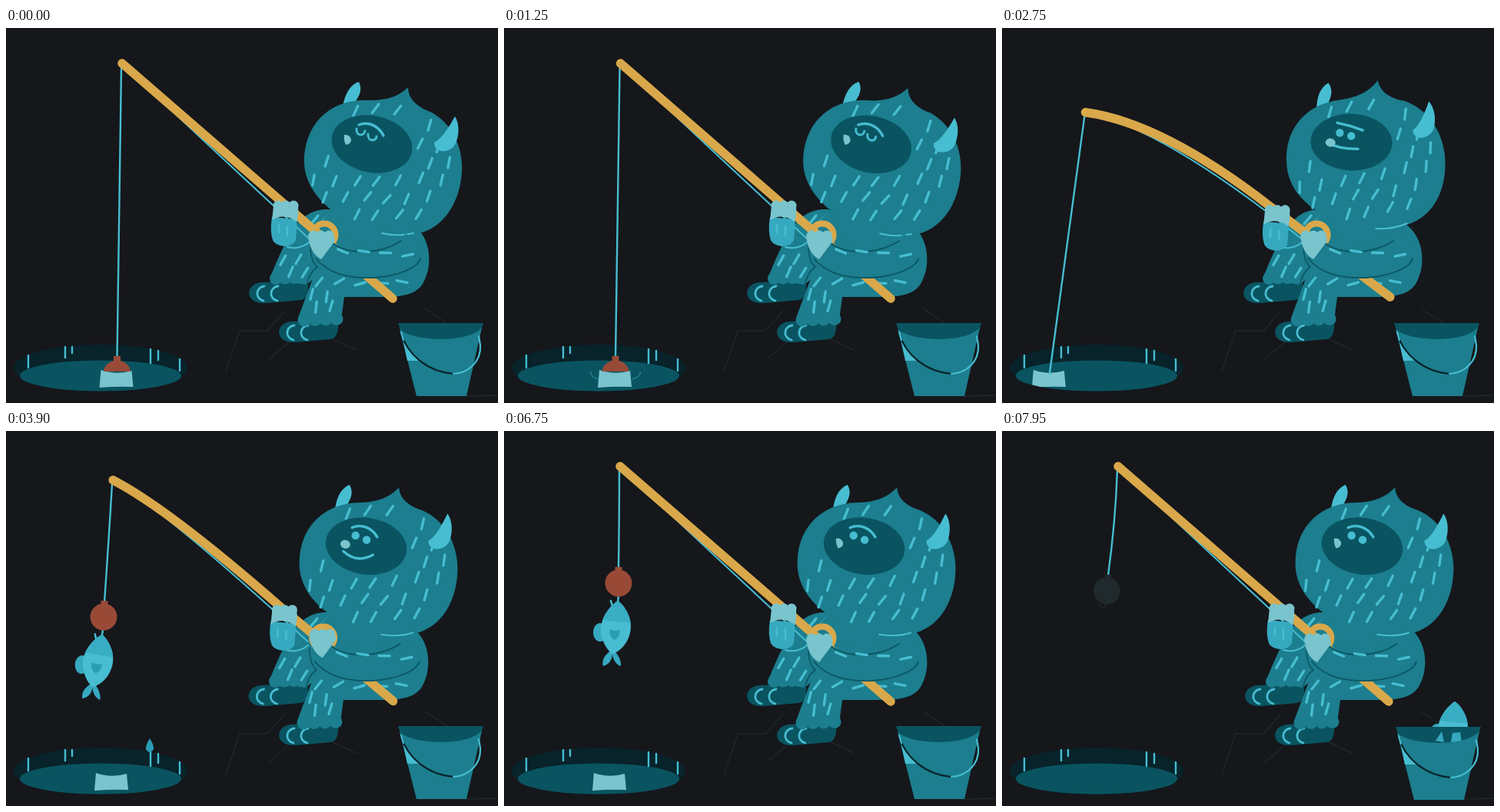
An HTML page with a canvas for the animation above (8 s loop, 640 px wide and 488 px high).

```html
<!DOCTYPE html>
<html lang="en">
<head>
<meta charset="utf-8">
<title>Ice fishing</title>
<style>
html, body { margin: 0; width: 100%; height: 100%; overflow: hidden; background: #15171b; }
canvas { display: block; width: 640px; height: 488px; }
</style>
</head>
<body>
<canvas id="stage" width="640" height="488"></canvas>
<script>
const ctx = document.getElementById('stage').getContext('2d');
const LOOP = 8000, BITE = 1750, LIFT = 3400, THROW = 7300, RELEASE = 7480, LAND = 7860;
const C = {
  bg: '#15171b', fur: '#1c7e8e', deep: '#0a5461', line: '#0b5663', lite: '#47bdd1',
  pale: '#79c4cd', mitt: '#36a9c0', gold: '#d9a84b', bob: '#994a37', ring: '#08232a',
  crack: '#20262a', fish: '#48bcd1', fishHead: '#38adc3', fin: '#2a9db4', dim: '#20292c'
};

const fill = (d, color) => { ctx.fillStyle = color; ctx.fill(new Path2D(d)); };
const stroke = (d, color, w) => {
  ctx.strokeStyle = color;
  ctx.lineWidth = w;
  ctx.stroke(new Path2D(d));
};
const oval = (x, y, rx, ry, color, rot = 0) => {
  ctx.fillStyle = color;
  ctx.beginPath();
  ctx.ellipse(x, y, rx, ry, rot, 0, Math.PI * 2);
  ctx.fill();
};
const group = (x, y, rot, draw) => {
  ctx.save();
  ctx.translate(x, y);
  ctx.rotate(rot);
  draw();
  ctx.restore();
};
const mix = (a, b, k) => a + (b - a) * k;
const part = (t, a, b) => Math.max(0, Math.min(1, (t - a) / (b - a)));
const ease = (t, a, b) => { const k = part(t, a, b); return k * k * (3 - 2 * k); };
const bump = (t, a, b) => Math.sin(Math.PI * part(t, a, b));
const noise = n => { const v = Math.sin(n * 12.9898) * 43758.5453; return v - Math.floor(v) - .5; };

// Staggered, jittered fur marks inside a box; angle depends on x.
function fur(x0, y0, x1, y1, gap, angle, inside = () => true) {
  let d = '', row = 0;
  for (let y = y0; y <= y1; y += gap * .85, row++) {
    for (let x = x0 + (row % 2) * gap / 2; x <= x1; x += gap) {
      const seed = x * 1.7 + y * 3.1;
      const px = x + noise(seed) * 6, py = y + noise(seed + 5) * 6;
      if (!inside(px, py)) continue;
      const a = (angle(px) + noise(seed + 9) * 14) * Math.PI / 180;
      const dx = Math.cos(a) * 7, dy = Math.sin(a) * 7;
      d += `M${px - dx},${py - dy}L${px + dx},${py + dy}`;
    }
  }
  stroke(d, C.lite, 3.4);
}
const onHead = (x, y) =>
  Math.hypot((x - 490) / 94, (y - 180) / 82) < 1 && Math.hypot((x - 476) / 62, (y - 151) / 46) > 1;

function scene(t) {
  const fight = bump(t, 2150, LIFT);
  const bend = ease(t, BITE, 2150) - ease(t, LIFT, 4160)
    + .12 * fight * Math.sin((t - 2150) / 100) + .1 * bump(t, THROW, RELEASE);
  const lean = .9 * bump(t, 0, BITE) - 14.5 * ease(t, BITE, 2150)
    + 17.5 * ease(t, 2500, 3200) - 6.3 * ease(t, LIFT, 3900);
  const tip = [mix(151, 107, bend) + .7 * bump(t, 0, BITE), mix(46, 112, bend)];

  const since = Math.max(0, t - 3900);
  const sway = -9 * Math.exp(-since / 500) * Math.cos(since / 700 * Math.PI * 2);
  const back = bump(t, THROW, RELEASE), fling = bump(t, RELEASE, 7850), settle = ease(t, 7800, 7950);
  const hung = t > LIFT;
  const bobX = tip[0] + (hung ? sway - 2 - 40 * back + 50 * fling - 11 * settle
    : -6.5 - 45 * bump(t, 2400, LIFT));
  const bobY = 428 + 24 * ease(t, BITE, 1900) - 274 * ease(t, LIFT, 4070)
    - 60 * fling + 10 * settle;
  const laugh = .08 * Math.sin(part(t, 5150, 5900) * Math.PI * 6);
  const open = ease(t, 4500, 4900) - ease(t, 6350, 6600) + laugh;
  return {
    t, bend, lean, tip, bobX, bobY, hung, open,
    ctrl: [212 - 4 * bend, 99 + 26 * bend * bend],
    grip: [mix(363, 348, bend), mix(230, 232, bend)],
    butt: [mix(503, 505, bend), mix(352, 350, bend)],
    swing: hung ? -.006 * sway + .5 * back - .6 * fling + .08 * settle : 0,
    mirror: hung ? mix(bobX, 137 + 4 * open, ease(t, LIFT, 3800)) : bobX - 1
  };
}

function ground() {
  ctx.fillStyle = C.bg;
  ctx.fillRect(0, 0, 640, 488);
  stroke('M363,368L340,394H304L286,447M370,407L342,431M425,405L455,419M545,365L575,385M598,479L640,478', C.crack, 1.4);
}

function pool({ t, mirror, bobX }) {
  oval(123, 442.5, 113, 30.5, C.ring);
  oval(123, 452.5, 105, 20, C.deep);
  stroke('M29,426V442M77,415V429M86,415V423M188,418V436M198,420V432M226,431V446', C.lite, 2.4);
  if (t < RELEASE) {
    ctx.save();
    ctx.beginPath();
    ctx.ellipse(123, 452.5, 105, 20, 0, 0, Math.PI * 2);
    ctx.clip();
    group(mirror, 457, 0, () => fill('M-20,-12Q0,-5 20,-11L22,10Q0,9 -22,11Z', C.pale));
    ctx.restore();
  }
  ctx.globalAlpha = .7 * bump(t, 100, 1900);
  ctx.strokeStyle = C.lite;
  ctx.lineWidth = 1;
  for (const a of [-.15, 2.29]) {
    ctx.beginPath();
    ctx.ellipse(bobX, 449, mix(20, 36, part(t, 0, 1600)), 11, 0, a, a + 1);
    ctx.stroke();
  }
  ctx.globalAlpha = 1;
}

// Hangs from its mouth at 0,0.
function fish() {
  oval(-23, 41, 9, 12, C.mitt);
  fill('M-8,64C-18,71 -21,78 -19,85C-10,82 -7,76 -7,68C-7,76 -2,83 4,85C5,77 0,70 -5,64Z', C.mitt);
  const body = 'M0,0C-12,8 -24,25 -22,42C-20,55 -12,66 -7,69C6,65 17,50 17,33C17,20 9,6 0,0Z';
  fill(body, C.fish);
  ctx.save();
  ctx.clip(new Path2D(body));
  fill('M-30,-5H30V30L-30,24Z', C.fishHead);
  ctx.restore();
  fill('M-11,37Q-3,40 3,38Q3,47 -4,51Q-11,48 -11,37Z', C.fin);
}

function tackle({ t, tip, bobX, bobY, swing, hung }) {
  const end = Math.min(bobY, 450);
  const slack = ease(t, THROW, RELEASE) / 2;
  const midX = mix((tip[0] + bobX) / 2, tip[0], slack);
  stroke(`M${tip[0] - 1},${tip[1] + 4}Q${midX},${(tip[1] + end) / 2} ${bobX},${end}`, C.lite, 2.4);
  ctx.save();
  ctx.beginPath();
  ctx.rect(0, 0, 640, 447);
  ctx.clip();
  group(bobX, bobY, swing, () => {
    const color = t > 7870 ? C.dim : C.bob;
    if (hung && t < RELEASE) {
      stroke('M0,36L-1,46M-10,43L-8,50', C.lite, 2.5);
      group(-1, 43, swing * .4, fish);
    } else if (hung) {
      stroke('M0,36Q0,43 -5,42Q-8,41 -8,37', C.dim, 1.5);
    }
    ctx.fillStyle = color;
    ctx.fillRect(-4.5, -1, 9, 7);
    oval(0, 20, 17.5, hung ? 17.5 : 15.5, color);
  });
  ctx.restore();
}

function splash(t) {
  for (let i = 0; i < 3; i++) {
    const k = (t - 3450) / (300 + i * 100);
    if (k <= 0 || k >= 1) continue;
    group(115 + (i - 1) * 80 * k, 440 - 332 * k * (1 - k), 0, () =>
      fill('M0,-10Q6,0 5,4Q0,12 -5,4Q-6,0 0,-10Z', C.fin));
  }
}

function bucket(t) {
  const k = part(t, RELEASE, LAND), hit = part(t, LAND - 20, 7920);
  if (k > 0) group(mix(148, 589, k), mix(221, 352, k) - 1160 * k * (1 - k), k * Math.PI * 2, fish);
  group(2 * hit, hit, 0, () => {
    fill('M510,384H621L617,396Q605,406 566,406Q526,405 514,396Z', C.deep);
    if (k === 1) fill('M562,402L570,390L573,404ZM582,404L584,392L594,391L596,404Z', C.mitt);
    fill('M512,392Q526,404 566,405Q606,404 619,390L599,479H534Z', C.fur);
    fill('M517,409Q526,424 540,433H522Z', C.lite);
    stroke('M514,397C522,425 548,447 582,450', C.ring, 2.2);
    stroke('M582,450C602,449 618,434 617,413L615,401M514,396L517,406', C.lite, 2.2);
  });
}

function foot(x, y) {
  group(x, y, 0, () => {
    fill('M16,0L77,-3Q79,22 67,23L22,27C-6,29 -6,2 16,0Z', C.deep);
    stroke('M20,5C9,6 7,21 19,24M38,5C27,6 25,21 37,24', C.lite, 2.8);
  });
}

function hem(x, y, step, r) {
  for (let i = 0; i < 4; i++) oval(x + i * step, y - i * .5, r, r, C.fur);
}

function lowerBody(bend) {
  foot(316 - bend * 2, 331);
  group(-4 * bend, 0, 0, () => {
    fill('M366,276C355,295 349,312 343,326L391,334L420,310L416,270Z', C.fur);
    hem(351, 326, 12, 8);
    fur(362, 302, 388, 324, 17, () => -62);
    fill('M432,238C405,231 388,243 376,258L370,282C388,290 400,279 432,280Z', C.fur);
    fur(402, 248, 418, 250, 16, () => -48);
    stroke('M366,285Q382,289 394,279', C.lite, 2);
  });
  foot(355, 382);
  group(-4 * bend, 0, 0, () => {
    fill('M426,236L530,256C553,273 556,310 542,333C533,347 515,350 490,350H440L436,380L380,377L402,318C390,292 398,258 426,236Z', C.fur);
    hem(388, 380, 14, 8.5);
    stroke('M396,282Q396,304 405,311Q394,318 391,336', C.line, 1.6);
    fur(396, 348, 432, 370, 19, () => -77);
    fur(408, 330, 520, 332, 27, x => (x - 490) * .6);
  });
}

function face({ t, open }) {
  oval(476, 151, 53, 37, C.deep, .2);
  const strain = t > 1950 && t < 3450;
  stroke(strain ? 'M462,123Q478,129 493,138' : 'M459,126C472,121 485,128 491,140', C.lite, 3.4);
  if (t < 2420) {
    stroke('M456,131C455,141 466,141 467,134M471,138C470,148 482,148 482,141', C.lite, 3);
  } else {
    oval(463, 136.5, 5.2, 5.2, C.lite);
    oval(477, 143, 5.2, 5.2, C.lite);
  }
  if (strain) {
    stroke('M444,146Q458,157 483,161', C.lite, 3.4);
  } else if (open > .12) {
    group(465, 153, 0, () => {
      ctx.scale(1, open);
      fill('M-26,-7C-12,-11 12,-4 26,4C29,15 21,24 7,25C-12,24 -25,10 -26,-7Z', C.lite);
      stroke('M-10,15Q5,7 20,16', C.fin, 1);
    });
  } else if (t > 3000 && t < 6000) {
    stroke('M446,156Q462,173 484,163', C.lite, 3.4);
  }
  if (t > 1950 && t < 5000) oval(449, 147, 6.5, 5.5, C.pale, .3);
  else fill('M440,139Q447,138 449,145Q449,151 442,152Q439,146 440,139Z', C.pale);
}

function head(s) {
  group(451, 280, s.lean * Math.PI / 180, () => {
    ctx.translate(-451, -280);
    fill('M438,102C441,86 447,74 459,70C464,80 460,88 453,98Z', C.lite);
    fill('M430,242C398,219 386,193 388,167C392,116 430,92 470,94C496,95 512,88 523,77C523,91 533,102 552,109C581,124 595,156 593,188C589,238 560,267 526,269L470,288L428,265Z', C.fur);
    fill('M557,149C568,143 576,129 584,115C590,124 590,140 584,152C577,163 557,164 557,149Z', C.lite);
    fur(402, 106, 585, 262, 27, x => -52 - Math.abs(x - 490) * .27, onHead);
    stroke('M489,267Q510,272 530,267', C.lite, 2);
    face(s);
  });
}

function rod({ tip, ctrl, grip, butt, bend }) {
  stroke(`M${tip}Q${ctrl[0]},${ctrl[1] + 6} ${394 - 5 * bend},274`, C.lite, 2);
  stroke(`M${tip}Q${ctrl} ${grip}L${butt}`, C.gold, 11.5);
}

function knuckles(x, y) {
  for (let i = 0; i < 3; i++) oval(x + i * 10, y, 6.5, 6.5, C.pale);
}

function arms({ t, bend }) {
  const crank = part(t, 2900, 4250) * Math.PI * 6;
  group(-6 * bend, 6 * bend, 0, () => {
    fill('M346,246L379,249L377,276C372,287 352,286 347,276Q343,264 346,246Z', C.mitt);
    fill('M348,231L380,233Q381,243 378,252Q362,240 346,250Z', C.pale);
    knuckles(354, 231);
    stroke('M355,256V266M366,258V270', C.lite, 2.5);
  });
  group(-5 * bend, 0, 0, () => {
    ctx.strokeStyle = C.gold;
    ctx.lineWidth = 8;
    ctx.beginPath();
    ctx.arc(414, 269, 14.5, 0, Math.PI * 2);
    ctx.stroke();
    fill('M424,278C448,295 490,294 520,268L543,281C550,307 520,324 478,325C440,326 416,314 404,300Z', C.fur);
    stroke('M426,281C448,296 488,294 514,277', C.line, 1.8);
    stroke('M403,300C420,320 445,326 478,325C510,323 536,312 539,300', C.line, 1.8);
    fur(438, 293, 526, 314, 28, x => (480 - x) * .4);
    group(3 * Math.sin(crank), -6 * Math.sin(crank) ** 2, 0, () => {
      fill('M393,270L425,265L428,277L410,301Q395,293 393,270Z', C.pale);
      knuckles(400, 270);
    });
  });
}

function draw(t) {
  const s = scene(t);
  ctx.lineCap = ctx.lineJoin = 'round';
  ground();
  pool(s);
  tackle(s);
  splash(t);
  lowerBody(s.bend);
  head(s);
  rod(s);
  arms(s);
  bucket(t);
}

function frame() {
  draw(Math.floor(performance.now() % LOOP / 50) * 50);
  requestAnimationFrame(frame);
}
frame();
</script>
</body>
</html>
```
